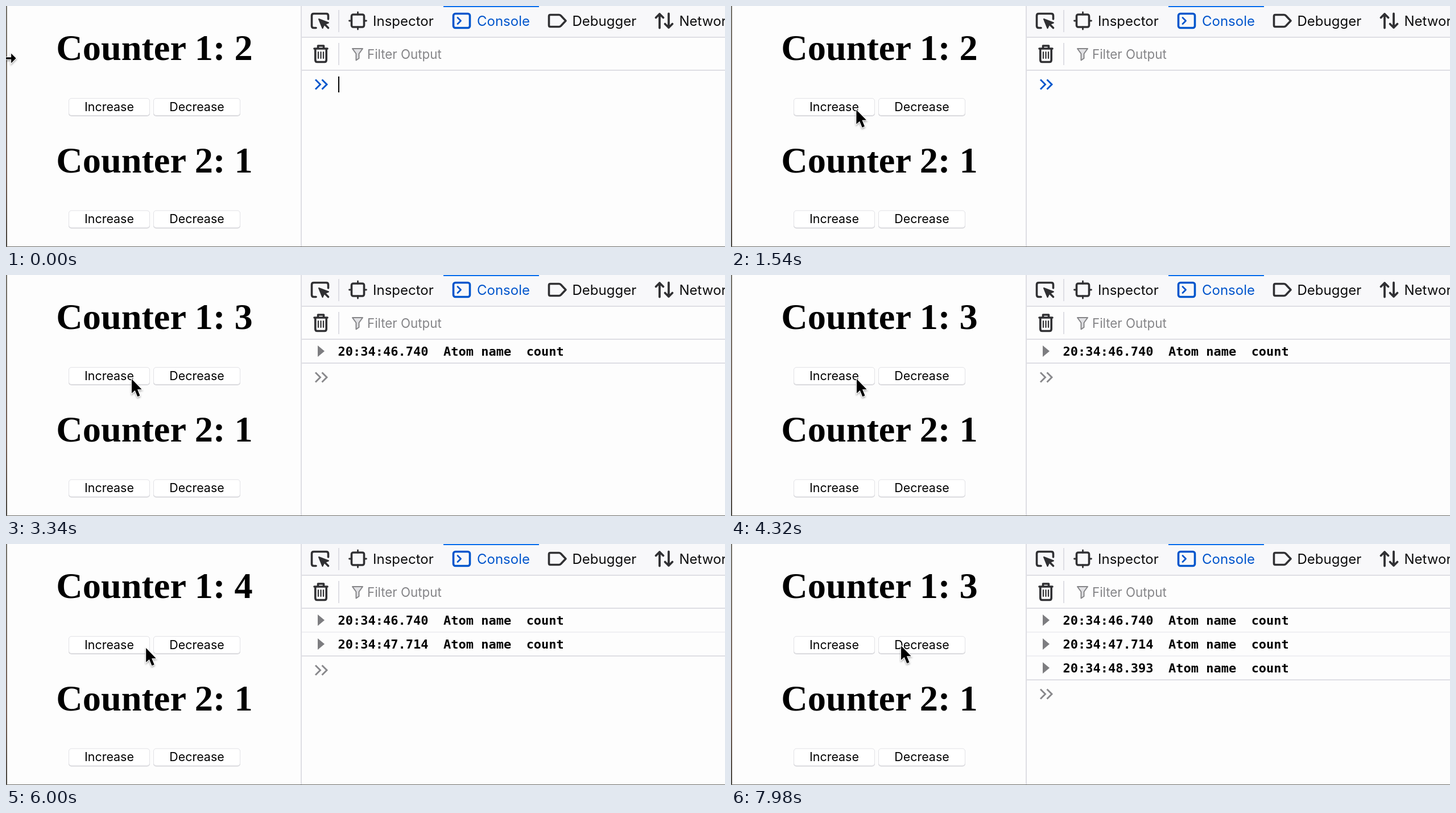
Animation of 1264x424 px, one loop 8 s. Source, as an HTML page:

```html
<!DOCTYPE html>
<html lang="en">
<head>
<meta charset="utf-8">
<title>Counters and console</title>
<style>
  html, body { margin: 0; width: 100%; height: 100%; overflow: hidden; background: #fdfdfd; }
  svg { display: block; width: 1264px; height: 424px; }
  text { white-space: pre; }
  .title { font: bold 64.3px "Liberation Serif", "Times New Roman", serif; text-anchor: middle; }
  .btn { font: 21.4px Inter, sans-serif; text-anchor: middle; }
  .tab { font: 24px Inter, sans-serif; fill: #0c0c0d; }
  .tab.on { fill: #0055cc; }
  .hint { font: 22.3px Inter, sans-serif; fill: #858588; }
  .log { font: bold 22px "DejaVu Sans Mono", monospace; }
  .icon { fill: none; stroke: #303033; stroke-width: 3.6; stroke-linecap: round; stroke-linejoin: round; }
  .rule { fill: #dedee4; }
</style>
</head>
<body>
<svg viewBox="0 0 1264 424">
  <defs>
    <linearGradient id="edge" x2="0" y2="1">
      <stop offset="0" stop-color="#74726a"/>
      <stop offset=".7" stop-color="#755f54"/>
      <stop offset="1" stop-color="#4a4842"/>
    </linearGradient>
    <filter id="shade" x="-50%" y="-50%" width="200%" height="200%">
      <feDropShadow dx="0" dy="2" stdDeviation="1.8" flood-color="#333" flood-opacity=".45"/>
    </filter>
  </defs>
  <rect width="1264" height="424" fill="#fdfdfd"/>

  <g id="page"></g>

  <!-- developer tools -->
  <rect x="520" width="744" height="54" fill="#f8f8fa"/>
  <g class="rule">
    <rect x="518" width="2" height="424"/>
    <rect x="520" y="54" width="744" height="2"/>
    <rect x="520" y="112" width="744" height="2"/>
    <rect x="584" y="7" width="2" height="39"/>
    <rect x="584" y="65" width="2" height="39"/>
  </g>
  <rect x="769" width="168" height="2" fill="#0a6fec"/>

  <g class="icon">
    <path d="M545 38.5H541Q537.500 38.500 537.500 35V17Q537.500 13.500 541 13.500H563Q566.500 13.500 566.500 17V23"/>
    <path d="M550 23L567 29.500 559.500 32.500 556.500 39Z" fill="#303033" stroke-width="2"/>
    <path d="M560 32L566.500 38.500"/>
    <rect x="607.500" y="15" width="22" height="22" rx="3"/>
    <path d="M618.500 11V15M618.500 37V41M603.500 26H607M630 26H633.500" stroke-width="2.800"/>
    <path d="M957 15.500H972Q974 15.500 975.500 17L984 26 975.500 35Q974 36.500 972 36.500H957Q954.500 36.500 954.500 34V18Q954.500 15.500 957 15.500Z"/>
    <path d="M1149 38.500V14M1142.500 20.500L1149 14 1155.500 20.500M1165 13.500V38M1158.500 31.500L1165 38 1171.500 31.500" stroke-width="3.800"/>
    <path d="M542 75H565M548.500 74V70H558.500V74M543.800 75V95Q543.800 98.500 547 98.500H560Q563.200 98.500 563.200 95V75"/>
    <path d="M549 81V92M553.500 81V92M558 81V92" stroke-width="2.200"/>
    <g stroke="#0055cc">
      <rect x="786.500" y="13.500" width="29" height="25" rx="3.500"/>
      <path d="M794 20.500L799.500 26 794 31.500" stroke-width="2.800"/>
    </g>
    <path d="M609 75H627L620.500 84V92L615.500 95.500V84Z" fill="#e2e2e5" stroke="#858588" stroke-width="2"/>
  </g>
  <text class="tab" x="645" y="35">Inspector</text>
  <text class="tab on" x="828" y="35">Console</text>
  <text class="tab" x="995.500" y="35">Debugger</text>
  <text class="tab" x="1183.500" y="35">Network</text>
  <text class="hint" x="635" y="92.800">Filter Output</text>

  <g id="logs"></g>
  <path id="prompt" d="M544 129.500L552.500 138 544 146.500M555.500 129.500L564 138 555.500 146.500"
        fill="none" stroke-width="2.900"/>
  <rect id="caret" x="584" y="124" width="2" height="28"/>

  <rect width="2" height="424" fill="url(#edge)"/>
  <rect y="423" width="1264" height="1" fill="#6a6a66"/>

  <g id="cursor" filter="url(#shade)" stroke="#fff" stroke-width="2" paint-order="stroke">
    <path id="arrow" d="M1 2V27L6.700 22 11.300 33 15.500 31.200 11 20.200H18.600Z"/>
    <path id="resize" d="M-9 -1.700H5V-8.500L13.500 0 5 8.500V1.700H-9Z"/>
  </g>
</svg>

<script>
  const LOOP = 8000;
  const BLUR = 2750, CARET_OFF = 1400, ARROW_FROM = 120;

  // each click logs a line and sets the first counter
  const clicks = [
    { at: 2970, count: 3, time: "20:34:46.740" },
    { at: 5700, count: 4, time: "20:34:47.714" },
    { at: 7600, count: 3, time: "20:34:48.393" }
  ];

  const linear = p => p;
  const easeIn = p => p * p;
  const easeOut = p => 1 - (1 - p) ** 2;

  // time, x, y, easing into this point
  const path = [
    [0, 4, 92, linear],
    [820, 113, 117, linear],
    [1600, 220, 181, easeOut],
    [5760, 220, 181, linear],
    [6000, 245, 181, easeIn],
    [6600, 298, 177, easeOut],
    [LOOP, 298, 177, linear]
  ];

  const $ = id => document.getElementById(id);
  const show = (el, on) => el.setAttribute("visibility", on ? "visible" : "hidden");

  const button = (x, y, w, label) => `
    <rect x="${x}" y="${y + 1}" width="${w}" height="31" rx="5" fill="#d2d2d6"/>
    <rect x="${x + .5}" y="${y + .5}" width="${w - 1}" height="30" rx="4.500" fill="#fff" stroke="#e2e2e6"/>
    <text class="btn" x="${x + w / 2}" y="${y + 22.6}">${label}</text>`;

  const counter = (n, y, value) => `
    <text class="title" x="261" y="${y + 95}">Counter ${n}: <tspan id="value${n}">${value}</tspan></text>
    ${button(110, y + 162, 143, "Increase")}
    ${button(259, y + 162, 153, "Decrease")}`;

  $("page").innerHTML = counter(1, 0, 2) + counter(2, 197.5, 1);

  $("logs").innerHTML = clicks.map((c, i) => `
    <g transform="translate(0 ${i * 42})">
      <path d="M548 124L560 134 548 144Z" fill="#7d7d80"/>
      <text class="log" x="583.500" y="142">${c.time}  Atom name  count</text>
      <rect class="line" x="520" y="154" width="744" height="2"/>
    </g>`).join("");
  const rows = [...$("logs").children];

  function cursorAt(t) {
    const i = path.findIndex(k => k[0] > t);
    const [t0, x0, y0] = path[i - 1];
    const [t1, x1, y1, ease] = path[i];
    const p = ease((t - t0) / (t1 - t0));
    return [x0 + (x1 - x0) * p, y0 + (y1 - y0) * p];
  }

  function draw(t) {
    const done = clicks.filter(c => c.at <= t).length;
    $("value1").textContent = done ? clicks[done - 1].count : 2;
    rows.forEach((row, i) => {
      show(row, i < done);
      row.querySelector(".line").setAttribute("fill", i === done - 1 ? "#dedee4" : "#efeff2");
    });
    $("prompt").setAttribute("transform", `translate(0 ${done * 42})`);
    $("prompt").setAttribute("stroke", t < BLUR ? "#0055cc" : "#88888b");
    show($("caret"), t < CARET_OFF);
    show($("resize"), t < ARROW_FROM);
    show($("arrow"), t >= ARROW_FROM);
    $("cursor").setAttribute("transform", `translate(${cursorAt(t)})`);
  }

  const start = performance.now();
  function tick() {
    draw((performance.now() - start) % LOOP);
    requestAnimationFrame(tick);
  }
  draw(0);
  requestAnimationFrame(tick);
</script>
</body>
</html>
```
